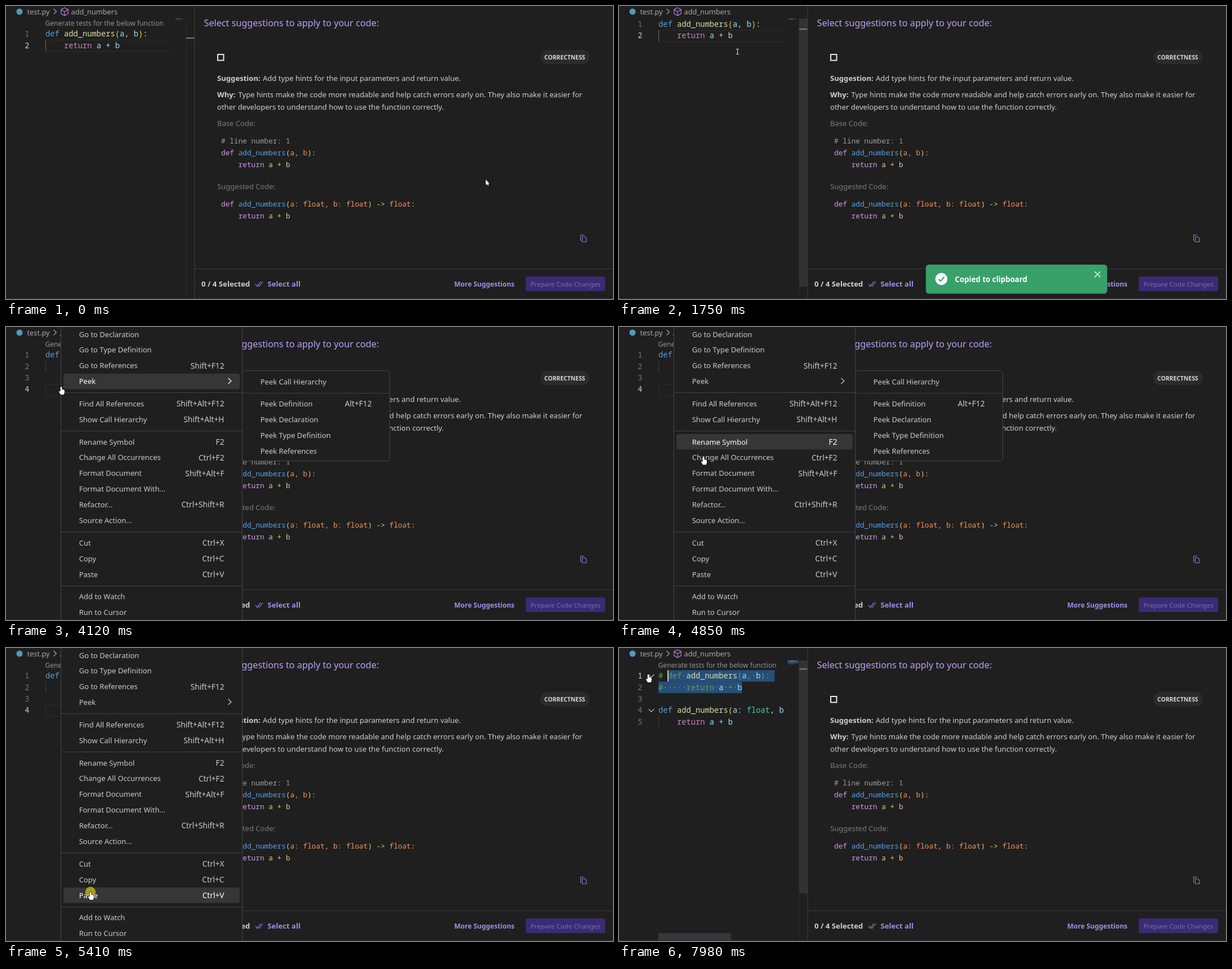
Animation, 1078 px wide and 520 px high, one loop 8 s. Source, as an HTML page with a canvas:

```html
<!DOCTYPE html>
<html lang="en">
<head>
<meta charset="utf-8">
<title>Code suggestions</title>
<style>
  html, body { margin: 0; width: 100%; height: 100%; overflow: hidden; background: #1f1f1f; }
  canvas { display: block; }
</style>
</head>
<body>
<canvas id="stage" width="1078" height="520"></canvas>
<script>
const ctx = document.getElementById('stage').getContext('2d');
const LOOP = 8000;
const SANS = '"Noto Sans", "Open Sans", sans-serif';
const MONO = '"Noto Sans Mono", "DejaVu Sans Mono", monospace';
const BG = '#1f1f1f', TEXT = '#d0d0d0', DIM = '#7c7c7c', PURPLE = '#a48ce4';
const CODE_X = 70, CODE_SIZE = 13.75, COL = 8.25, ROW = 20.35;

// Moments (ms) at which something happens
const COPY = 860, CLICK = 2040, LENS_BACK = 2300, ENTER1 = 2600, ENTER2 = 2910, SYMBOL_GONE = 3130;
const MENU_OPEN = 3860, SUB_OPEN = 4090, SUB_CLOSE = 5010, MENU_CLOSE = 5520, PASTE = 5570;
const DRAG = 6850, DROP = 7480, COMMENT = 7940;
const PRESSES = [[COPY, 960], [CLICK, 2140], [3770, MENU_OPEN], [5400, 5500], [DRAG, DROP]];

const POINTER_PATH = [
  [30, 852, 308], [150, 890, 330], [340, 1000, 396], [460, 1025, 412], [1120, 1025, 412],
  [1250, 920, 385], [1480, 390, 225], [1610, 212, 158], [1670, 212, 158], [1750, 210, 81], [1890, 218, 53],
  [3420, 218, 53], [3720, 98, 106], [4650, 98, 106], [4850, 150, 230], [5080, 150, 370],
  [5260, 150, 433], [5940, 150, 433], [6350, 180, 240], [6710, 214, 78], [DRAG, 214, 76],
  [7400, 60, 50], [7530, 52, 47]
];

const clamp = (v, lo = 0, hi = 1) => Math.min(hi, Math.max(lo, v));
const ramp = (t, from, to) => clamp((t - from) / (to - from));
const within = (t, from, to) => t >= from && t < to;
const easeOut = k => 1 - (1 - k) ** 3;

function pointerAt(t) {
  const next = POINTER_PATH.findIndex(p => p[0] > t);
  if (next === 0) return POINTER_PATH[0].slice(1);
  if (next < 0) return POINTER_PATH.at(-1).slice(1);
  const [a, b] = [POINTER_PATH[next - 1], POINTER_PATH[next]];
  const k = ramp(t, a[0], b[0]);
  return [a[1] + (b[1] - a[1]) * k, a[2] + (b[2] - a[2]) * k];
}

// ---- drawing helpers; text is placed by its visual middle ----
function text(str, x, mid, size, color = TEXT, weight = 400, family = SANS, align = 'left') {
  ctx.font = `${weight} ${size}px ${family}`;
  ctx.fillStyle = color;
  ctx.textAlign = align;
  ctx.fillText(str, x, mid + size * 0.35);
}

function rect(x, y, w, h, color) {
  ctx.fillStyle = color;
  ctx.fillRect(x, y, w, h);
}

function panel(x, y, w, h, r, fill, stroke) {
  ctx.beginPath();
  ctx.roundRect(x, y, w, h, r);
  if (fill) { ctx.fillStyle = fill; ctx.fill(); }
  if (stroke) { ctx.strokeStyle = stroke; ctx.lineWidth = 1; ctx.stroke(); }
}

function disc(x, y, r, color) {
  ctx.fillStyle = color;
  ctx.beginPath();
  ctx.arc(x, y, r, 0, Math.PI * 2);
  ctx.fill();
}

function stroke(d, color, width = 1, x = 0, y = 0) {
  ctx.save();
  ctx.translate(x, y);
  ctx.strokeStyle = color;
  ctx.lineWidth = width;
  ctx.stroke(new Path2D(d));
  ctx.restore();
}

function shape(d, x, y) {
  const path = new Path2D(d);
  ctx.save();
  ctx.translate(x, y);
  ctx.strokeStyle = '#111';
  ctx.lineWidth = 1.6;
  ctx.stroke(path);
  ctx.fillStyle = '#fff';
  ctx.fill(path);
  ctx.restore();
}

// Tokens alternate between text and colour
function code(tokens, x, mid, size) {
  for (let i = 0; i < tokens.length; i += 2) {
    text(tokens[i], x, mid, size, tokens[i + 1], 400, MONO);
    x += ctx.measureText(tokens[i]).width;
  }
}

// ---- editor ----
const KEY = '#569cd6', FUNC = '#dcdcaa', PAREN = '#ffd700', VAR = '#9cdcfe', FLOW = '#c586c0',
      PLAIN = '#d4d4d4', TYPE = '#4ec9b0', NOTE = '#6a9955';
const HEAD = ['def ', KEY, 'add_numbers', FUNC, '(', PAREN, 'a', VAR];
const DEF = [...HEAD, ', ', PLAIN, 'b', VAR, ')', PAREN, ':', PLAIN];
const TYPED = [...HEAD, ': ', PLAIN, 'float', TYPE, ', ', PLAIN, 'b', VAR, ': ', PLAIN];
const RETURN = ['    return ', FLOW, 'a', VAR, ' + ', PLAIN, 'b', VAR];
const asComment = tokens => ['# ', NOTE,
  ...tokens.map((v, i) => i % 2 && v !== VAR && v !== FUNC ? NOTE : v)];
const plainText = tokens => tokens.filter((_, i) => i % 2 === 0).join('');

function editorState(t, [px, py]) {
  const lens = !within(t, COPY + 60, LENS_BACK);
  const count = t < ENTER1 ? 2 : t < ENTER2 ? 3 : t < PASTE ? 4 : 5;
  const commented = t >= COMMENT;
  const first = commented ? asComment(DEF) : DEF;
  const second = commented ? asComment(RETURN) : RETURN;
  const lines = [first, second, [], count === 5 ? TYPED : [], RETURN].slice(0, count);
  let line = count, col = t < CLICK ? 0 : count === 2 || count === 5 ? 14 : 0;
  const selecting = t >= DRAG;
  if (selecting) {
    line = py < 60 ? 1 : 2;
    col = commented ? 2 : clamp(Math.round((px - CODE_X) / COL), 0, line === 1 ? 22 : 14);
  }
  return { lens, lines, count, line, col, selecting, top: lens ? 49.5 : 32.3 };
}

function caretVisible(t) {
  if (t < CLICK || within(t, MENU_OPEN, PASTE)) return false;
  if (t < PASTE) return !within(t, 3200, 3730);
  const since = t >= DROP ? t - DROP : t >= DRAG ? 0 : t - PASTE;
  return since % 1060 < 530;
}

function selectLine(tokens, mid, from, to, newline) {
  const x = CODE_X + from * COL;
  rect(x, mid - 10.2, (to - from + (newline ? 1 : 0)) * COL, 20.4, '#264f78');
  [...plainText(tokens)].forEach((ch, i) => {
    if (ch === ' ' && i >= from && i < to)
      text('·', CODE_X + i * COL, mid, CODE_SIZE, '#6f8598', 400, MONO);
  });
}

function drawBreadcrumb(t) {
  disc(24, 10, 5.5, '#519aba');
  text('test.py', 37.5, 11, 12.75, '#a9a9a9');
  stroke('M84.5 5 L89.5 9.8 L84.5 14.6', '#a9a9a9', 1.2);
  if (within(t, SYMBOL_GONE, 7100)) {
    text('...', 95, 11, 12.75, '#a9a9a9');
  } else {
    stroke('M0-7 L6.3-3.6 V3.6 L0 7 L-6.3 3.6 V-3.6 Z M-6.3-3.6 L0 0 L6.3-3.6 M0 0 V7', '#b180d7', 1.2, 104, 10);
    text('add_numbers', 115.5, 11, 12.75, '#a9a9a9');
  }
}

function drawScrollbars(t, s) {
  rect(319.5, 22, 1, 497, '#2c2c2c');
  if (t >= 1560) {
    ctx.globalAlpha = ramp(t, 1540, 1610);
    rect(320, 22, 14.5, 476 - 15.6 * (s.count - 2 + s.lens), '#323234');
    ctx.globalAlpha = 1;
  }
  const mark = s.count === 5 ? 20.6 + 16.7 * s.line : 25 + 16 * s.line - (s.lens ? 0 : 16);
  rect(320, mark - 1, 14.5, 2, '#7c7c7c');
  if (s.count === 5) rect(69.5, 506, 129, 13, '#373739');
}

function drawMinimap(s) {
  if (s.selecting) rect(299, 22, 20, 4, '#264f78');
  s.lines.forEach((tokens, row) => {
    [...plainText(tokens)].forEach((ch, i) => {
      if (ch !== ' ') rect(300 + i * 0.65, 22 + row * 1.5, 0.6, 1, 'rgba(190,190,190,.45)');
    });
  });
}

function drawEditor(t, pointer) {
  const s = editorState(t, pointer);
  const middle = line => s.top + (line - 1) * ROW;
  drawBreadcrumb(t);
  drawMinimap(s);
  drawScrollbars(t, s);
  if (s.lens) text('Generate tests for the below function', 69.5, 31, 12, '#929292');

  ctx.save();
  ctx.beginPath();
  ctx.rect(0, 20, 294.5, 485);
  ctx.clip();
  if (!s.selecting) {
    const y = Math.round(middle(s.line) - 10);
    stroke(`M300 ${y + .5} H70.5 V${y + 20.5} H300`, '#2d2d2d');
  } else {
    const start = s.line === 1 ? s.col : 0;
    const end = plainText(s.lines[1]).length;
    if (s.line === 1) {
      selectLine(s.lines[0], middle(1), start, plainText(s.lines[0]).length, true);
      selectLine(s.lines[1], middle(2), 0, end, false);
    } else {
      selectLine(s.lines[1], middle(2), s.col, end, false);
    }
  }
  s.lines.forEach((tokens, i) => {
    const mid = middle(i + 1), active = i + 1 === s.line;
    if (tokens === RETURN) rect(70, mid - 10, 1, 20, active ? '#707070' : '#404040');
    text(i + 1, 41.5, mid, CODE_SIZE, active ? '#cccccc' : '#6e7681', 400, MONO, 'right');
    code(tokens, CODE_X, mid, CODE_SIZE);
  });
  if (caretVisible(t)) rect(CODE_X + s.col * COL - 0.5, middle(s.line) - 10, 1.8, 20, '#d0d0d0');
  ctx.globalAlpha = ramp(t, 7560, 7790);
  for (const line of [1, 4]) stroke('M-5 -2.5 L0 2.5 L5 -2.5', '#c5c5c5', 1.2, 57.5, middle(line));
  ctx.globalAlpha = 1;
  ctx.restore();
}

// ---- suggestions pane ----
const S_KEY = '#d09ae6', S_FUNC = '#5c9fe6', S_PARAM = '#f5945c', S_PLAIN = '#e8c98a';
const S_HEAD = ['def ', S_KEY, 'add_numbers', S_FUNC, '(', S_PLAIN];
const S_RETURN = ['    return ', S_KEY, 'a + b', S_PLAIN];

function drawSuggestions() {
  rect(334.5, 0, 1, 520, '#414141');
  text('Select suggestions to apply to your code:', 351.5, 30, 16.2, '#b9a3f7');
  ctx.strokeStyle = '#e8e8e8';
  ctx.lineWidth = 2;
  ctx.strokeRect(376, 86, 10.5, 10.5);
  panel(949, 78, 87.5, 25.5, 12.7, '#2b2b2b');
  text('CORRECTNESS', 992.3, 91, 10.4, '#d8d8d8', 600, SANS, 'center');

  text('Suggestion:', 375, 128, 13.1, TEXT, 700);
  text('Add type hints for the input parameters and return value.', 456, 128, 13.05);
  text('Why:', 375, 157.5, 13.1, TEXT, 700);
  text('Type hints make the code more readable and help catch errors early on. They also make it easier for', 412.5, 157.5, 13.05);
  text('other developers to understand how to use the function correctly.', 375, 179, 13.05);

  text('Base Code:', 375, 208.5, 13.05, DIM);
  code(['# line number: 1', '#9c9c9c'], 382, 239.5, 12.78);
  code([...S_HEAD, 'a, b', S_PARAM, '):', S_PLAIN], 382, 260.5, 12.78);
  code(S_RETURN, 382, 281.5, 12.78);

  text('Suggested Code:', 375, 320.5, 13.05, DIM);
  code([...S_HEAD, 'a: float, b: float', S_PARAM, ') -> ', S_PLAIN, 'float', S_PARAM, ':', S_PLAIN], 382, 351.5, 12.78);
  code(S_RETURN, 382, 372.5, 12.78);
  stroke('M1023.5 409.5 H1028 L1030.5 412 V418.5 H1023.5 Z M1022 416 H1020.5 V406.5 H1027', '#917ad6', 1.1);

  rect(335, 466, 743, 1, '#3a3a3a');
  text('0 / 4 Selected', 347, 493.5, 13.2, TEXT, 600);
  stroke('M443 493.5 L446 497.5 L452.5 489 M448.5 496.5 L449.5 497.5 L456 489', PURPLE, 1.1);
  text('Select all', 464.5, 493.5, 13.1, PURPLE, 600);
  text('More Suggestions', 796, 493.5, 12, PURPLE, 600);
  panel(923, 480, 141, 26, 3, '#392b74');
  text('Prepare Code Changes', 993.7, 493.5, 11.6, '#7b6eac', 400, SANS, 'center');
  rect(0, 519, 1078, 1, '#303030');
}

function drawToast(t) {
  const enter = easeOut(ramp(t, 930, 1250)), leave = ramp(t, 2150, 2350);
  if (!enter || leave === 1) return;
  ctx.save();
  ctx.globalAlpha = enter * (1 - leave);
  ctx.translate(706, 485 + 24 * (1 - enter));
  ctx.scale(1 - 0.15 * leave, 1 - 0.15 * leave);
  ctx.translate(-706, -485);
  panel(545, 459, 322, 51.5, 5.5, '#38a169');
  disc(572.5, 484.5, 10.7, '#fff');
  stroke('M568 485 L571.2 488.2 L577.5 481', '#38a169', 2);
  text('Copied to clipboard', 596.5, 485.5, 13.3, '#fff', 700);
  stroke('M844.8 471.3 L854.8 481.3 M854.8 471.3 L844.8 481.3', '#fff', 1.4);
  ctx.restore();
}

// ---- context menu ----
const MENU = [
  ['Go to Declaration'], ['Go to Type Definition'], ['Go to References', 'Shift+F12'], ['Peek', '>'], null,
  ['Find All References', 'Shift+Alt+F12'], ['Show Call Hierarchy', 'Shift+Alt+H'], null,
  ['Rename Symbol', 'F2'], ['Change All Occurrences', 'Ctrl+F2'], ['Format Document', 'Shift+Alt+F'],
  ['Format Document With...'], ['Refactor...', 'Ctrl+Shift+R'], ['Source Action...'], null,
  ['Cut', 'Ctrl+X'], ['Copy', 'Ctrl+C'], ['Paste', 'Ctrl+V'], null,
  ['Add to Watch'], ['Run to Cursor']
];
const SUBMENU = [['Peek Call Hierarchy'], null, ['Peek Definition', 'Alt+F12'], ['Peek Declaration'],
  ['Peek Type Definition'], ['Peek References']];

function drawItems(items, left, right, y, hoverY) {
  for (const item of items) {
    if (!item) {
      rect(left, Math.round(y - 8.2), right - left, 1, '#414141');
      y += 11.8;
      continue;
    }
    const [label, keys] = item;
    const hovered = Math.abs(hoverY - y) < 13.95;
    const color = hovered ? '#fff' : '#cccccc';
    if (hovered) panel(left + 4, y - 14, right - left - 8, 27.5, 4, '#363637');
    text(label, left + 31.7, y, 13, color);
    if (keys === '>') stroke('M-3 -5 L2.5 0 L-3 5', color, 1.2, right - 21.5, y - 1);
    else if (keys) text(keys, right - 31.5, y, 13.7, color, 400, SANS, 'right');
    y += 27.9;
  }
}

function drawMenu(t) {
  if (!within(t, MENU_OPEN, MENU_CLOSE)) return;
  const hoverY = pointerAt(t - 60)[1];
  panel(97.5, -20, 322, 560, 0, BG, '#454545');
  drawItems(MENU, 98, 419, 13, hoverY);
  if (within(t, SUB_OPEN, SUB_CLOSE)) {
    panel(419.5, 77.5, 262, 160, 5, BG, '#454545');
    drawItems(SUBMENU, 420, 681, 97, -100);
  }
}

// ---- pointer ----
const ARROW = 'M0 0 V9.8 L2.3 7.8 L3.8 11 L5.4 10.3 L4 7.2 H6.8 Z';
const HAND = 'M-1.3 .5 Q0 -1 1.3 .5 V4.5 L4.8 5.5 Q6 6 6 7.5 V10 L4.8 14 H-.8 L-4 9.2 Q-4 7.3 -2.4 7.8 L-1.3 8.8 Z';
const BEAM = 'M-2.5 -4.5 H2.5 M0 -4.5 V4.5 M-2.5 4.5 H2.5';

function drawPointer(t, [x, y]) {
  if (PRESSES.some(([from, to]) => within(t, from, to))) disc(x, y, 9.2, 'rgba(184,172,26,.88)');
  const overCopy = x > 1017 && y > 404;
  const overFold = x < 64;
  if (overCopy || overFold || within(t, MENU_OPEN, MENU_CLOSE)) shape(HAND, x, y);
  else if (x < 320) stroke(BEAM, '#d8d8d8', 1.1, Math.round(x) + .5, Math.round(y));
  else shape(ARROW, x, y);
}

function frame() {
  const t = performance.now() % LOOP;
  const pointer = pointerAt(t);
  rect(0, 0, 1078, 520, BG);
  drawEditor(t, pointer);
  drawSuggestions();
  drawToast(t);
  drawMenu(t);
  drawPointer(t, pointer);
  requestAnimationFrame(frame);
}
frame();
</script>
</body>
</html>
```
